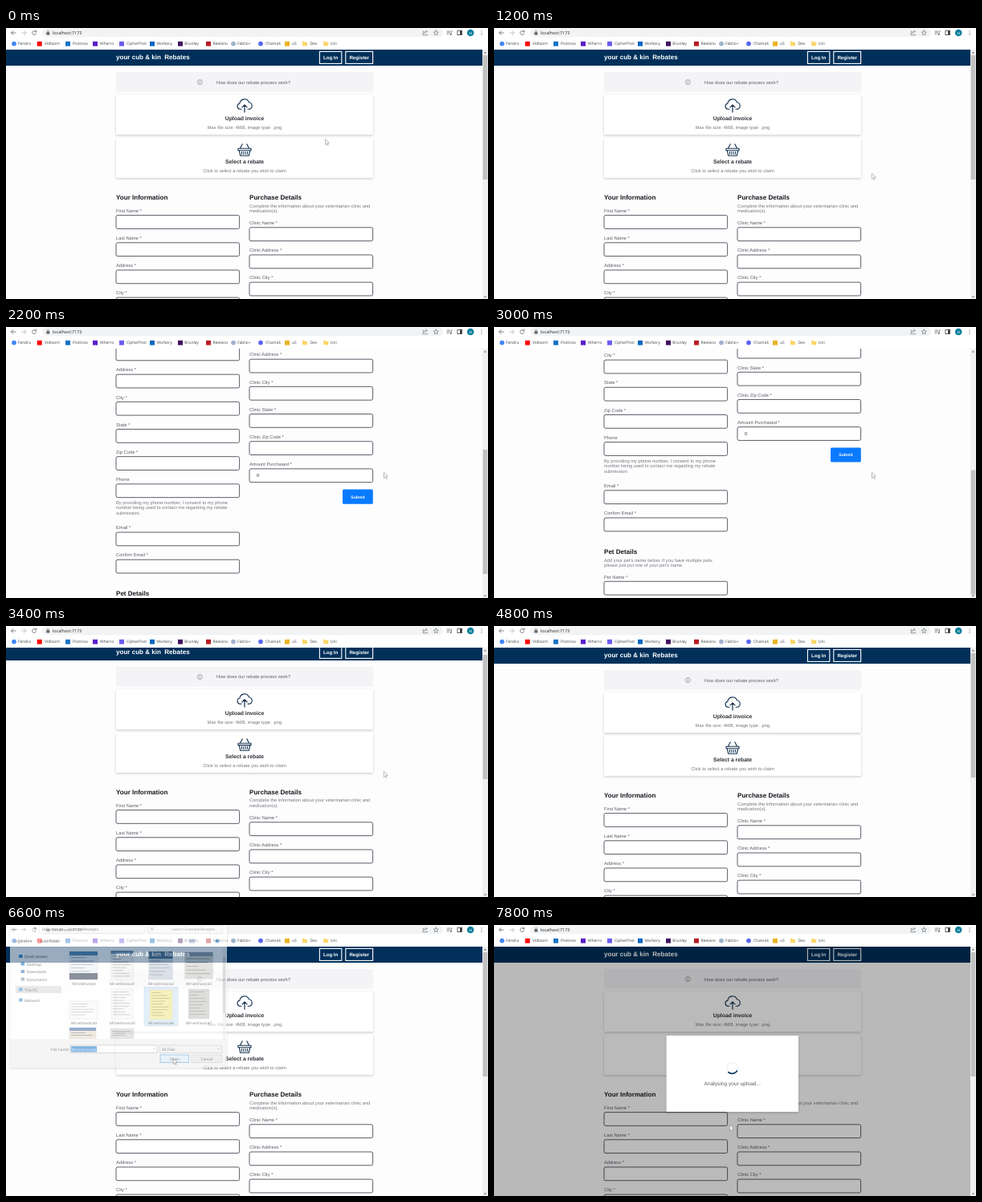
Recreate the animation shown at these times as an HTML page. Size 600 by 338 pixels, loop 8000 ms.

```html
<!DOCTYPE html>
<html lang="en">
<head>
<meta charset="utf-8">
<title>Rebate form</title>
<style>
  html, body { margin: 0; width: 100%; height: 100%; overflow: hidden; background: #fff; }
  svg { display: block; width: 100vw; height: 100vh; }
  text { font: 5.75px "Liberation Sans", Arial, sans-serif; fill: #5d5f66; text-rendering: geometricPrecision; white-space: pre; }
  .ui text { font-family: "Open Sans", sans-serif; fill: #3c4043; }
</style>
</head>
<body>
<svg id="stage" viewBox="0 0 600 338" preserveAspectRatio="none"></svg>
<script>
const LOOP = 8000, MAX_SCROLL = 295, NAVY = '#00305a', INK = '#17191f';

// markup helpers
const attrs = o => Object.entries(o).map(([k, v]) => ` ${k}="${v}"`).join('');
const rect = (x, y, w, h, fill, o = {}) =>
  `<rect x="${x}" y="${y}" width="${w}" height="${h}" fill="${fill}"${attrs(o)}/>`;
const circle = (x, y, r, fill, o = {}) => `<circle cx="${x}" cy="${y}" r="${r}" fill="${fill}"${attrs(o)}/>`;
const line = (d, color, w = 0.8, o = {}) =>
  `<path d="${d}" fill="none" stroke="${color}" stroke-width="${w}" stroke-linecap="round" stroke-linejoin="round"${attrs(o)}/>`;
// y is the middle of the lower-case line
const text = (x, y, s, style = '', anchor = 'start') =>
  `<text x="${x}" y="${y + 2}" text-anchor="${anchor}" style="${style}">${s.replace(/&/g, '&amp;')}</text>`;
const bold = (size, color) => `font-size:${size}px;font-weight:700;fill:${color}`;
const group = (id, body, o = {}) => `<g id="${id}"${attrs(o)}>${body}</g>`;

function field(x, label, y, value = '') {
  return text(x, y - 14.2, label) +
    rect(x, y - 8.4, 153.6, 16.8, '#fff', { rx: 2, stroke: '#484d58', 'stroke-width': 0.9 }) +
    text(x + 9, y, value, 'fill:#333');
}

function fields(x, y, labels) {
  return labels.map((s, i) => field(x, s, y + i * 34.17, s.startsWith('Amount') ? '0' : '')).join('');
}

function lines(x, y, rows) {
  return rows.map((s, i) => text(x, y + i * 6.5, s, 'fill:#777980')).join('');
}

function card(y, title, note) {
  return rect(137, y, 320, 50, '#fff', { rx: 1, filter: 'url(#shadow)' }) +
    text(297, y + 30, title, bold(6.82, '#2b2e36'), 'middle') +
    text(297, y + 41, note, 'fill:#777980', 'middle');
}

function page() {
  const cloud = line('M293 101.2h-1.6a3.6 3.6 0 0 1-.5-7.1a6 6 0 0 1 11.6-1.3a4.3 4.3 0 0 1 .6 8.4h-2', '#12304d', 1.1) +
    line('M297 105v-9.2m-3 3l3-3l3 3', '#12304d', 1.2);
  const basket = line('M289 150.3h16v2.4h-16zM290.2 152.7l1.5 6.6h10.6l1.5-6.6M291.5 150l2.7-5.2M302.5 150l-2.7-5.2', '#12304d', 1.1) +
    line('M293.4 154.5v3M295.8 154.5v3M298.2 154.5v3M300.6 154.5v3', '#12304d', 1);
  const button = (x, w, s) => rect(x, 29.4, w, 15, 'none', { stroke: '#fff', 'stroke-width': 1.1 }) +
    text(x + w / 2, 36.7, s, bold(6.15, '#fff'), 'middle');

  return rect(0, 27, 593, 640, '#fdfdfe') +
    rect(0, 27, 593, 20, NAVY) +
    text(137, 37.2, 'your cub & kin', bold(8.07, '#fff')) +
    text(197.3, 37.2, 'Rebates', bold(8.07, '#fff')) +
    button(390.4, 27.4, 'Log In') + button(422.8, 33.8, 'Register') +
    rect(137, 55, 320, 24.5, '#f4f4f7', { rx: 1 }) +
    circle(241.3, 67.5, 3, 'none', { stroke: '#777', 'stroke-width': 0.6 }) +
    line('M241.3 67.2v1.8M241.3 65.8v.1', '#777', 0.7) +
    text(262, 67.5, 'How does our rebate process work?') +
    card(83, 'Upload invoice', 'Max file size: 4MB, image type: .png') + cloud +
    card(136.7, 'Select a rebate', 'Click to select a rebate you wish to claim') + basket +
    text(137, 212, 'Your Information', bold(8.07, INK)) +
    fields(137, 242, ['First Name *', 'Last Name *', 'Address *', 'City *', 'State *', 'Zip Code *', 'Phone']) +
    lines(137, 461.5, ['By providing my phone number, I consent to my phone',
      'number being used to contact me regarding my rebate', 'submission.']) +
    fields(137, 507.2, ['Email *', 'Confirm Email *']) +
    text(137, 576, 'Pet Details', bold(8.07, INK)) +
    lines(137, 585.5, ["Add your pet's name below. If you have multiple pets,", "please just put one of your pet's name."]) +
    field(137, 'Pet Name *', 620.7) +
    text(303, 212, 'Purchase Details', bold(8.07, INK)) +
    lines(303, 221.5, ['Complete the information about your veterinarian clinic and', 'medication(s).']) +
    fields(303, 257.2, ['Clinic Name *', 'Clinic Address *', 'Clinic City *', 'Clinic State *', 'Clinic Zip Code *', 'Amount Purchased *']) +
    rect(419, 445.4, 37.8, 18.2, '#0a7bff', { rx: 1.5 }) +
    text(438, 454.4, 'Submit', bold(5.1, '#fff'), 'middle');
}

function toolbar() {
  const grey = '#5f6368';
  const marks = [
    [10, 15, 'Fendra', '#4285f4', 1], [41.7, 48, 'Vidloom', '#f00'], [77, 83, 'Postnoo', '#1673c5'],
    [111, 117, 'Wherro', '#5a1fc8'], [144, 150, 'CipherPost', '#6b5cf0'], [182, 187.5, 'Workory', '#0a66c2'],
    [217, 222.3, 'Brunley', '#42145f'], [252, 257.5, 'Reelano', '#b81d24'], [283, 288, 'Fablio+', '#9fb2d0', 1],
    [317, 323, 'Chatnok', '#5865f2', 1], [350, 356, 'uS', '#e9b424']
  ];
  const folder = x => `<path d="M${x - 3} 16.8h2.4l.8 .9h2.8v4.6h-6z" fill="#fcd567"/>`;
  const small = 'font-size:4.9px';
  return rect(0, 0, 600, 27, '#fff') + rect(45, 0.3, 499, 11, '#f1f3f4', { rx: 5.5 }) +
    line('M12 6H6.5m2.4-2.4L6.5 6l2.4 2.4', grey) +
    line('M19.5 6H25m-2.4-2.4L25 6l-2.4 2.4', '#b4b7ba') +
    line('M37.2 4.6a2.5 2.5 0 1 0 .3 2.2M37.6 3v1.8h-1.8', grey) +
    rect(50.3, 5.3, 4, 3.2, grey, { rx: 0.5 }) + line('M51.2 5.3v-.8a1.1 1.1 0 0 1 2.2 0v.8', grey, 0.6) +
    text(58, 5.9, 'localhost:7173', 'font-size:5.4px;fill:#202124') +
    line('M520.5 4.5h-1.3v4.3h5V7.6M520.6 7c.2-2 1.5-2.6 3.4-2.6m-1.3-1.4l1.4 1.4l-1.4 1.4', grey, 0.6) +
    line('M535.3 3l.9 2l2.2.2l-1.7 1.4l.5 2.2l-1.9-1.2l-1.9 1.2l.5-2.2l-1.7-1.4l2.2-.2z', grey, 0.6) +
    line('M549 4h3.8M549 5.8h3.8M549 7.6h2M554.3 8V4h1', grey, 0.7) + circle(553.6, 8, 0.9, grey) +
    rect(562, 3.2, 5.4, 5.4, 'none', { stroke: '#3c4043', 'stroke-width': 0.8 }) + rect(565, 3.2, 2.4, 5.4, '#3c4043') +
    circle(578.2, 6, 4.3, '#0b7f9c') + text(578.2, 5.6, 'M', 'font-size:4px;fill:#fff', 'middle') +
    [3.8, 6, 8.2].map(y => circle(592, y, 0.6, grey)).join('') +
    marks.map(([x, tx, s, c, round]) => (round ? circle(x, 19.6, 2.9, c) : rect(x - 3, 16.8, 6, 5.8, c)) +
      text(tx, 19.4, s, small)).join('') +
    folder(372) + text(378.5, 19.4, 'Dev', small) + folder(398.3) + text(404, 19.4, 'Uni', small);
}

function scrollbar() {
  return rect(593, 27, 7, 311, '#f1f1f1') +
    '<path d="M594.8 31.6l1.7-2l1.7 2zM594.8 334.4l1.7 2l1.7-2z" fill="#777"/>' +
    rect(593.7, 34, 5.6, 155, '#c1c1c1', { id: 'thumb' });
}

function sheet(x, y, w, h, paper, ink, rows) {
  let s = rect(x, y, w, h, paper, { stroke: '#c9c9c9', 'stroke-width': 0.4 });
  for (let i = 0; i < rows; i++)
    s += rect(x + 2, y + 3 + i * (h - 5) / rows, (w - 4) * (0.45 + 0.5 * Math.abs(Math.sin(i * 2.3 + x))), 0.8, ink);
  return s;
}

function dialog() {
  const small = 'font-size:4.8px', soft = 'font-size:4.8px;fill:#777';
  const cols = [97, 145, 193, 240];
  const box = (x, y, w, h, stroke, fill = '#fff') => rect(x, y, w, h, fill, { stroke, 'stroke-width': 0.6 });
  const side = [['Quick access', 39, 23, '#3f8fd8'], ['Desktop', 48.5, 25.5, '#2e86d6'], ['Downloads', 58, 25.5, '#4a8ac0'],
    ['Documents', 67.5, 25.5, '#8aa0b4'], ['This PC', 80.5, 23, '#4a9ad8'], ['Network', 93.5, 23, '#4a9ad8']];
  const thumbs =
    sheet(79, 33, 35, 35, '#eef2f7', '#8a98aa', 7) + rect(79, 33, 35, 5, '#5b87b8') + rect(79, 60, 35, 8, '#3f4b5c') +
    sheet(130.5, 32, 28, 37, '#f4f4f2', '#999', 9) + rect(130.5, 32, 28, 4, '#6f8fb2') +
    sheet(177.5, 33, 30, 35, '#c9d3dd', '#7b8794', 7) + rect(177.5, 33, 30, 9, '#54718f') +
    sheet(222.5, 34, 35, 33, '#d4d3cf', '#85837f', 6) + rect(222.5, 34, 35, 5, '#8c98a6') +
    sheet(79, 95, 35, 22, '#fafafa', '#b5b5b5', 5) +
    sheet(131, 80, 27, 37, '#f7f7f7', '#a9a9a9', 9) +
    sheet(227, 80, 26, 37, '#c8c8c6', '#8b8b8b', 8) +
    sheet(79, 128, 33, 14, '#e6dccb', '#7b7b80', 3) + rect(79, 128, 33, 4, '#5279b0') +
    sheet(130, 129, 29, 13, '#d6d6d6', '#8d8d8d', 3);
  const names = cols.concat(cols).map((x, i) =>
    text(x, i < 4 ? 72.7 : 121.5, 'Mirvelinvoice' + (i || ''), small, 'middle')).join('');

  return rect(5, -4, 270, 182, '#fff', { filter: 'url(#shadow)' }) +
    line('M14 5.5H9m2-2l-2 2l2 2', '#666', 0.6) + line('M19 5.5h5m-2-2l2 2l-2 2', '#aaa', 0.6) +
    line('M36 8V3m-2 2l2-2l2 2', '#666', 0.6) +
    box(41, 0.8, 131, 9.6, '#d5d5d5') + text(45, 5.2, 'Documents  ›  ExampleReceipts', small) +
    box(177, 0.8, 92, 9.6, '#d5d5d5') + circle(182, 5, 1.5, 'none', { stroke: '#777', 'stroke-width': 0.5 }) +
    text(206, 5.2, 'Search ExampleReceipts', soft) +
    text(9, 20, 'Organise ▾', small) + text(43, 20, 'New folder', small) +
    rect(228, 17.5, 7, 5, '#9db7d3') + circle(263, 20, 2.5, '#3d8ad0') +
    rect(5, 27, 270, 0.5, '#e3e3e3') +
    rect(12, 76, 57, 9, '#dcdcdc') +
    side.map(([s, y, x, c]) => rect(x - 7, y - 2, 4.6, 4, c, { rx: 0.5 }) + text(x, y, s, small)).join('') +
    group('pick', rect(172, 77.5, 42, 48.5, '#d3e6f5', { stroke: '#a8cfec', 'stroke-width': 0.5 })) +
    thumbs + sheet(179, 81, 28, 37, '#f3e98f', '#a39a58', 9) + names +
    rect(269.5, 28, 4.5, 114, '#f0f0f0') + rect(270, 40, 3.5, 70, '#cdcdcd') +
    rect(5, 142, 270, 36, '#f0f0f0') +
    text(56, 155, 'File name:', small) + box(80, 150, 108, 9.6, '#9a9a9a') +
    group('chosen', rect(81, 151.2, 32, 7.2, '#2f80d0') + text(81.6, 154.8, 'Mirvelinvoice6', 'font-size:4.6px;fill:#fff')) +
    line('M183.5 154l1.2 1.3l1.2-1.3', '#666', 0.5) +
    box(191, 150, 77.5, 9.6, '#b5b5b5', '#eee') + text(194, 155, 'All Files', small) +
    line('M263.5 154l1.2 1.3l1.2-1.3', '#666', 0.5) +
    box(192, 162, 35.5, 9.6, '#2080cc', '#dcebf6') + text(209.8, 166.8, 'Open', small, 'middle') +
    box(231, 162, 37.5, 9.6, '#b5b5b5', '#e4e4e4') + text(249.8, 166.8, 'Cancel', small, 'middle');
}

function modal() {
  return rect(0, 27, 593, 311, '#000', { opacity: 0.27 }) +
    rect(214.7, 138, 164.3, 95, '#fff', { filter: 'url(#shadow)' }) +
    circle(296.5, 178.3, 7, 'none', { stroke: '#efeff1', 'stroke-width': 1.2 }) +
    circle(296.5, 178.3, 7, 'none', { id: 'spin', stroke: '#0f3a60', 'stroke-width': 1.7, pathLength: 100, 'stroke-dasharray': '31 69' }) +
    text(296.8, 197.7, 'Analysing your upload...', 'font-size:6.6px', 'middle');
}

document.getElementById('stage').innerHTML =
  `<defs><clipPath id="view">${rect(0, 27, 593, 311, '#000')}</clipPath>
  <filter id="shadow" x="-10%" y="-20%" width="120%" height="150%">
    <feDropShadow dx="0" dy="1.2" stdDeviation="1.5" flood-color="#000" flood-opacity=".2"/></filter></defs>` +
  `<g clip-path="url(#view)">${group('page', page())}</g>` +
  group('modal', modal()) + group('bars', toolbar() + scrollbar(), { class: 'ui' }) +
  group('dialog', dialog(), { class: 'ui' }) +
  group('cursor', '<path d="M0 0v7l1.6-1.4l1.1 2.5l1.2-.6l-1.1-2.4l2.2-.1z" fill="#fff" stroke="#777" stroke-width=".5" stroke-linejoin="round"/>');

const el = id => document.getElementById(id);
const [pageEl, modalEl, dialogEl, cursor, thumb, spin, pick, chosen] =
  ['page', 'modal', 'dialog', 'cursor', 'thumb', 'spin', 'pick', 'chosen'].map(el);

const ease = (t, a, b) => {
  const p = Math.min(1, Math.max(0, (t - a) / (b - a)));
  return p * p * (3 - 2 * p);
};

// pointer legs: start, end, destination
const START = [397.5, 138.5];
const LEGS = [
  [100, 1200, 470.3, 181.3], [3900, 4650, 301, 112], [5400, 5900, 198, 100],
  [6050, 6450, 208.3, 166.3], [6750, 7450, 293.5, 249.3]
];

function pointer(t) {
  let [x, y] = START;
  for (const [a, b, tx, ty] of LEGS) {
    const k = ease(t, a, b);
    x += (tx - x) * k;
    y += (ty - y) * k;
  }
  return [x, y];
}

const show = (node, alpha) => {
  node.style.display = alpha > 0 ? '' : 'none';
  node.setAttribute('opacity', alpha);
};

function draw(t) {
  const scroll = MAX_SCROLL * (ease(t, 1521, 2450) - ease(t, 3010, 3430));
  pageEl.setAttribute('transform', `translate(0 ${-scroll})`);
  thumb.setAttribute('y', 34 + scroll * 0.49);

  const [x, y] = pointer(t);
  cursor.setAttribute('transform', `translate(${x} ${y})`);
  show(cursor, t > 4650 && t < 5200 ? 0 : 1);

  show(dialogEl, ease(t, 5000, 5160) - ease(t, 6510, 6720));
  show(pick, t >= 5950 ? 1 : 0);
  show(chosen, t >= 5950 ? 1 : 0);

  show(modalEl, ease(t, 6800, 7000));
  const turn = ((t - 7700) / 1200 % 1 + 1) % 1;
  spin.setAttribute('transform', `rotate(${18 + 360 * ease(turn, 0, 1)} 296.5 178.3)`);
}

const t0 = performance.now();
function tick() {
  draw((performance.now() - t0) % LOOP);
  requestAnimationFrame(tick);
}
tick();
</script>
</body>
</html>
```
